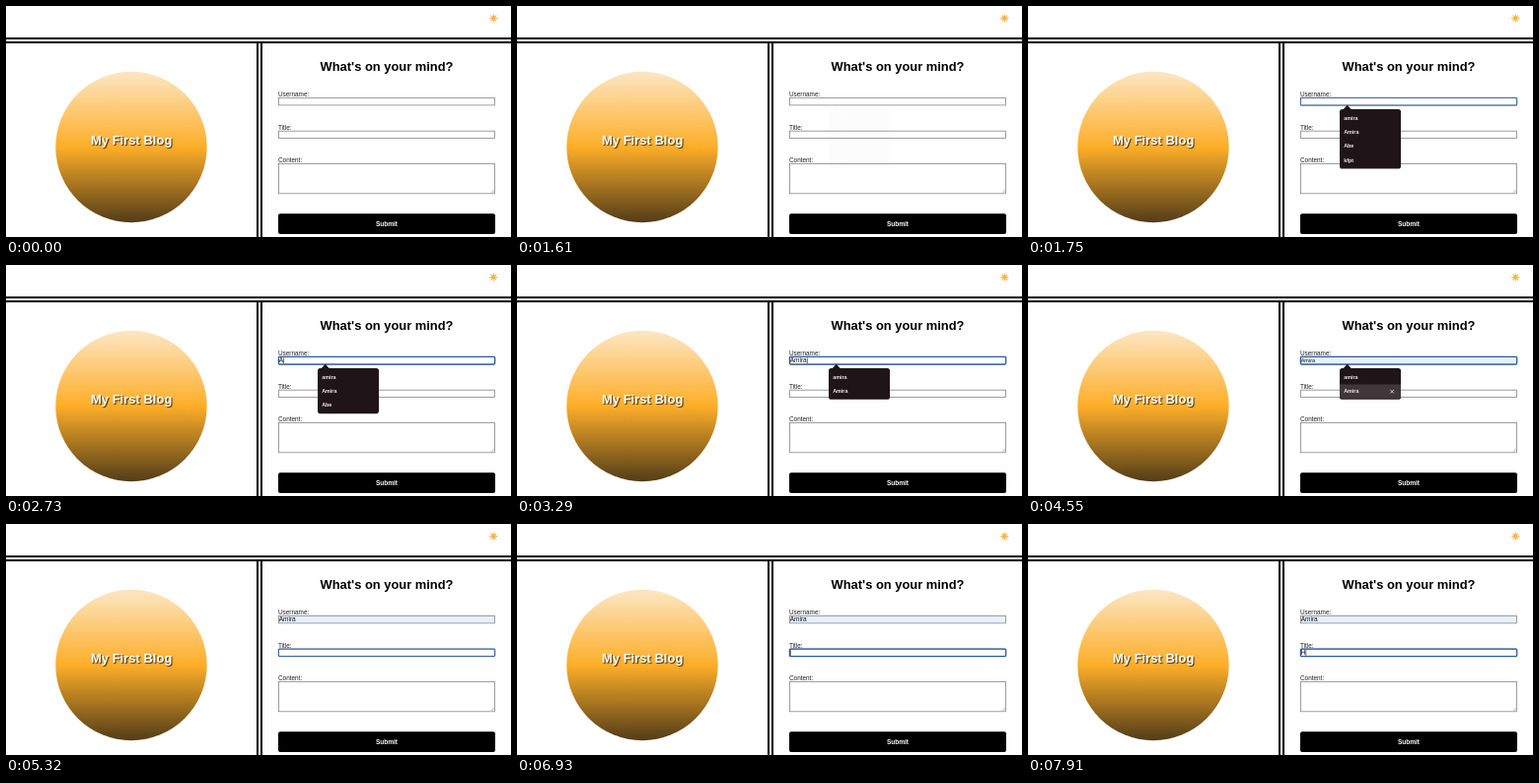
Animation of 512 by 235 pixels, one loop 8 s. Source, as an HTML page:

```html
<!DOCTYPE html>
<html lang="en">
<head>
<meta charset="utf-8">
<title>My First Blog</title>
<style>
  html, body { margin: 0; width: 100%; height: 100%; overflow: hidden; background: #fff; }
  svg { display: block; font-family: "Liberation Sans", Arial, sans-serif; }
  .bold { font-weight: 700; }
  .label { font-size: 6.4px; fill: #222; }
  .value { font-size: 6.5px; fill: #111; }
  .field { fill: #fff; stroke: #858585; stroke-width: .8; }
  .ring { fill: none; stroke: #28599f; stroke-width: 1.25; }
  .caret { fill: #111; }
  .item { font-size: 5.4px; font-weight: 700; fill: #efeaeb; }
  .title { font-size: 13px; fill: #fff; text-shadow: 1px 1px 1px rgba(0, 0, 0, .75); }
</style>
</head>
<body>
<svg width="512" height="235" viewBox="0 0 512 235">
  <defs>
    <linearGradient id="dusk" x1="0" y1="0" x2="0" y2="1">
      <stop offset="0" stop-color="#fde6c4"/>
      <stop offset=".5" stop-color="#fdae28"/>
      <stop offset="1" stop-color="#533c18"/>
    </linearGradient>
  </defs>

  <g id="sun" transform="translate(494.3 12.5)" stroke="#eda64a" stroke-width="1">
    <circle r="2.4" fill="#f9b536" stroke="none"/>
  </g>

  <path d="M0 32h512v2H0zM0 36h512v2H0zM254 38h2v197h-2zM258 38h2v197h-2z"/>

  <circle cx="127" cy="143.5" r="76.7" fill="url(#dusk)"/>
  <text class="bold title" x="86" y="141">My First Blog</text>

  <text class="bold" x="386" y="65.5" font-size="12.9" text-anchor="middle">What's on your mind?</text>

  <text class="label" x="276" y="92">Username:</text>
  <g id="user" transform="translate(276 93)"></g>
  <text class="label" x="276" y="126">Title:</text>
  <g id="heading" transform="translate(276 126.7)"></g>
  <text class="label" x="276" y="159.3">Content:</text>
  <rect class="field" x="276.5" y="160.5" width="219" height="30.3"/>
  <path d="M492 189.7l2.7-2.7M493.6 189.7l1.1-1.1" stroke="#777" stroke-width=".5"/>

  <rect x="276" y="211.3" width="220" height="20.7" rx="2"/>
  <text class="bold" x="386" y="223.8" font-size="6.5" fill="#fff" text-anchor="middle">Submit</text>

  <g id="menu" transform="translate(316 105)">
    <path d="M3.3 .4L7.7-4.2 12.1 .4z" fill="#1f1518"/>
    <rect id="panel" width="62" rx="2.6" fill="#1f1518"/>
    <g id="hover">
      <rect y="2" width="62" height="14.4" fill="#40373a"/>
      <path d="M51.3 7.5l3.6 3.6m0-3.6l-3.6 3.6" stroke="#efeaeb" stroke-width=".8"/>
    </g>
    <g id="items"></g>
  </g>
</svg>
<script>
const LOOP = 8000, ROW = 14.4;
const NAMES = ["amira", "Amira", "Abe", "kfpt"];
const TYPED = [[0, ""], [2660, "A"], [2870, "Am"], [3010, "Ami"], [3150, "Amir"], [3290, "Amira"]];
const HEADING = [[0, ""], [7700, "H"]];
const HOVER = [[0, -1], [4130, 0], [4270, 1], [4760, -1]];
const MENU = [[1610, 0], [1730, 1], [4730, 1], [4830, 0]];
const USER_RING = [[1610, 0], [1680, .6], [1960, 1], [5250, 1], [5320, 0]];
const HEADING_RING = [[5250, 0], [5320, .8], [5530, 1]];
const USER_CARET = [[1820, 0], [1960, 1], [2310, 1], [2520, 0], [2650, 0], [2660, 1],
  [3430, 1], [3570, 0], [3700, 0], [3780, 1], [4120, 1], [4130, 0], [4760, 0], [4830, 1], [5250, 1], [5320, 0]];
const HEADING_CARET = [[5320, 0], [5460, 1], [5670, 1], [5810, 0], [6090, 0], [6300, 1],
  [6930, 1], [7070, 0], [7350, 0], [7560, 1]];

const $ = id => document.getElementById(id);

function add(parent, tag, attrs) {
  const el = document.createElementNS("http://www.w3.org/2000/svg", tag);
  for (const key in attrs) el.setAttribute(key, attrs[key]);
  return parent.appendChild(el);
}

// Value of the latest step reached
const step = (steps, t) => steps.filter(s => s[0] <= t).pop()[1];

// Linear interpolation between points
function ramp(points, t) {
  const i = points.findIndex(p => p[0] > t);
  if (i < 0) return points[points.length - 1][1];
  if (i === 0) return points[0][1];
  const [t0, a] = points[i - 1], [t1, b] = points[i];
  return a + (b - a) * (t - t0) / (t1 - t0);
}

function makeField(id) {
  const g = $(id);
  const box = add(g, "rect", { class: "field", x: .5, y: .5, width: 219, height: 7.4 });
  const ring = add(g, "rect", { class: "ring", x: .4, y: .4, width: 219.3, height: 7.6, rx: 1.2 });
  const text = add(g, "text", { class: "value", x: .7, y: 6.4 });
  const caret = add(g, "rect", { class: "caret", y: 1.4, width: .6, height: 5.8 });
  return (value, focus, blink, preview = false, filled = false) => {
    text.textContent = value;
    text.style.fontSize = preview ? "5.5px" : "";
    box.style.fill = filled ? "#e8f0fe" : "";
    ring.style.opacity = focus;
    caret.style.opacity = blink;
    caret.setAttribute("x", .9 + (value ? text.getComputedTextLength() : 0));
  };
}

for (let a = 0; a < 360; a += 45) add($("sun"), "path", { d: "M0-2.6V-4", transform: `rotate(${a})` });

const drawUser = makeField("user"), drawHeading = makeField("heading");
const items = NAMES.map(() => add($("items"), "text", { class: "item", x: 4.2 }));

function drawMenu(typed, row, opacity) {
  const found = NAMES.filter(n => n.toLowerCase().startsWith(typed.toLowerCase()));
  items.forEach((el, i) => {
    el.textContent = found[i] || "";
    el.setAttribute("y", 10.6 + i * ROW);
  });
  $("panel").setAttribute("height", 3 + found.length * ROW);
  $("hover").style.display = row < 0 ? "none" : "";
  $("hover").setAttribute("transform", `translate(0 ${row * ROW})`);
  $("menu").style.opacity = opacity;
}

function draw(t) {
  const typed = step(TYPED, t), row = step(HOVER, t);
  drawUser(row < 0 ? typed : NAMES[row], ramp(USER_RING, t), ramp(USER_CARET, t), row >= 0, t >= 4130);
  drawHeading(step(HEADING, t), ramp(HEADING_RING, t), ramp(HEADING_CARET, t));
  drawMenu(typed, row, ramp(MENU, t));
}

const start = performance.now();
function tick() {
  draw((performance.now() - start) % LOOP);
  requestAnimationFrame(tick);
}
tick();
</script>
</body>
</html>
```
